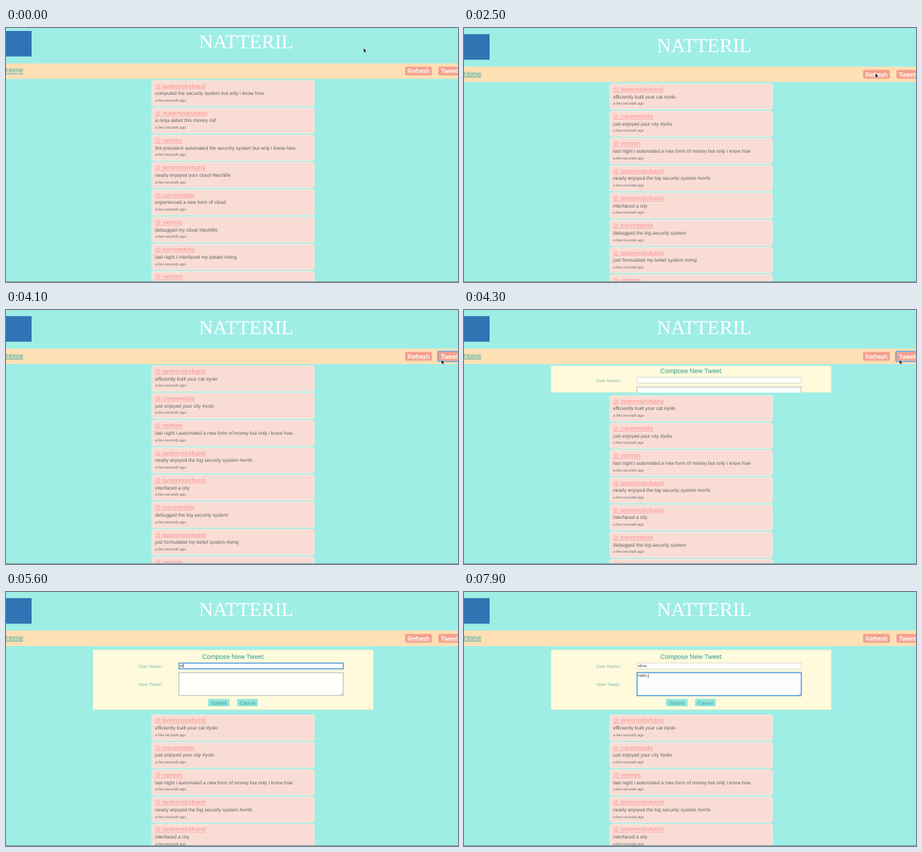
An HTML page that plays this animation: 600 by 338 pixels, repeating every 8000 ms.

```html
<!DOCTYPE html>
<html lang="en">
<head>
<meta charset="utf-8">
<title>Microblog demo</title>
<style>
  html, body { margin: 0; width: 100%; height: 100%; overflow: hidden; background: #9eeee6; }
  svg { display: block; width: 600px; height: 338px; }
  text { font-family: "Liberation Sans", Arial, sans-serif; text-rendering: geometricPrecision; white-space: pre; }
  .title { font: 26.3px "Liberation Serif", "Times New Roman", serif; fill: #fff; text-anchor: middle; }
  .home { font-size: 8.7px; text-decoration: underline; stroke-width: .15; }
  .btn { font-size: 8.3px; fill: #fff; stroke: #fff; stroke-width: .25; }
  .name { font-size: 7.7px; font-weight: bold; fill: #fba3a3; text-decoration: underline; }
  .msg { font-size: 6.5px; fill: #606060; }
  .ago { font-size: 4.9px; font-style: italic; fill: #666; }
  .head { font-size: 8.6px; fill: #58ada6; stroke: #58ada6; stroke-width: .2; text-anchor: middle; }
  .label { font-size: 6px; fill: #72bcb4; text-anchor: end; }
  .small { font-size: 6.6px; fill: #4b9d99; text-anchor: middle; }
  .typed { font-size: 5.4px; fill: #444; }
</style>
</head>
<body>
<svg viewBox="0 0 600 338">
  <defs><clipPath id="cut"><rect id="cutBox" x="115" width="373"/></clipPath></defs>
  <rect width="600" height="338" fill="#9eeee6"/>
  <g id="page">
    <rect y="8.2" width="34" height="34" fill="#3174b3"/>
    <text class="title" x="318.7" y="31.8">NATTERIL</text>
    <rect y="51.4" width="600" height="20.6" fill="#ffdfb4"/>
    <text class="home" id="home" x="-.3" y="63.8">Home</text>
    <rect x="529.8" y="55.8" width="35.6" height="11.6" rx="1.8" fill="#f5a08c"/>
    <text class="btn" x="533" y="64.7">Refresh</text>
    <rect x="574" y="55.8" width="30" height="11.6" rx="1.8" fill="#f5a08c"/>
    <text class="btn" x="577.3" y="64.7">Tweet</text>
    <rect id="ring" x="573.2" y="54.9" width="32" height="13.6" rx="1.5" fill="none" stroke="#65a5df" stroke-width="1.5"/>
    <g id="form" clip-path="url(#cut)">
      <rect id="panel" x="115.5" width="372" fill="#fffadb" stroke="#e3edc9" stroke-width=".8"/>
      <g id="fields">
        <text class="head" x="301.2" y="88.8">Compose New Tweet</text>
        <text class="label" x="207.6" y="100.6">User Name:</text>
        <rect id="user" x="229.7" y="94.6" width="218" height="7.7"/>
        <text class="typed" id="userText" x="231" y="100.2"></text>
        <text class="label" x="207.6" y="124.8">New Tweet:</text>
        <rect id="note" x="229.7" y="107.3" width="218" height="30.5"/>
        <path d="M444 137l3-3M445.8 137l1.200-1.200" stroke="#999" stroke-width=".5"/>
        <text class="typed" id="noteText" x="231" y="113.2"></text>
        <rect id="caret" width=".6" height="5.6" fill="#333"/>
        <rect x="268.4" y="142.4" width="28.200" height="9.700" fill="#8ee5dd"/>
        <text class="small" x="282.4" y="149.600">Submit</text>
        <rect x="306.800" y="142.400" width="27.200" height="9.700" fill="#8ee5dd"/>
        <text class="small" x="320.400" y="149.600">Cancel</text>
      </g>
    </g>
    <g id="oldList"></g>
    <g id="newList"></g>
  </g>
  <rect y="337" width="600" height="1" fill="#729f9b"/>
  <path id="arrow" d="M0 0V6.200L1.500 4.900L2.500 7.100L3.500 6.700L2.500 4.500H4.400Z" fill="#111" stroke="#fff" stroke-width=".5"/>
  <path id="beam" d="M-1.400-3Q0-3 0-2.200Q0-3 1.400-3M0-2.200V2.200M-1.400 3Q0 3 0 2.200Q0 3 1.400 3" fill="none" stroke="#333" stroke-width=".7"/>
</svg>
<script>
const LOOP = 8000, STEP = 100;
const REFRESH = 2500, OPEN = 4100, SLIDE = 430, FOCUS = 4800, TAB = 6600;
const SCROLL = 4.3, LIST_TOP = 74.2, PITCH = 36.27;
const $ = id => document.getElementById(id);

function add(parent, tag, attrs, text = "") {
  const node = document.createElementNS("http://www.w3.org/2000/svg", tag);
  set(node, attrs);
  node.textContent = text;
  parent.appendChild(node);
}
function set(node, attrs) {
  for (const key in attrs) node.setAttribute(key, attrs[key]);
}
const show = (node, on) => set(node, { visibility: on ? "visible" : "hidden" });
const move = (node, x, y) => set(node, { transform: `translate(${x} ${y})` });

const A = "lanternsbyhand", B = "hubertmalvoden", C = "velmon", D = "corynmelds";
const before = [
  [A, "computed the security system but only i know how"],
  [B, "a ninja aided this money #sf"],
  [C, "the president automated the security system but only i know how"],
  [A, "nearly enjoyed your cloud #techlife"],
  [D, "experienced a new form of cloud"],
  [C, "debugged my cloud #techlife"],
  [D, "last night i interfaced my potato #omg"],
  [C, ""]
];
const after = [
  [A, "efficiently built your cat #yolo"],
  [D, "just enjoyed your city #yolo"],
  [C, "last night i automated a new form of money but only i know how"],
  [A, "nearly enjoyed the big security system #vmfx"],
  [A, "interfaced a city"],
  [D, "debugged the big security system"],
  [A, "just formulated my belief system #omg"],
  [C, ""]
];

function buildList(list, posts) {
  posts.forEach(([user, msg], i) => {
    const y = LIST_TOP + i * PITCH;
    add(list, "rect", { x: 193.7, y, width: 215.6, height: 33.9, rx: 2, fill: "#f9ddd5", stroke: "#f4ebe0", "stroke-width": 1 });
    add(list, "text", { class: "name", x: 198, y: y + 9.7 }, "@ " + user);
    add(list, "text", { class: "msg", x: 198, y: y + 19.3 }, msg);
    add(list, "text", { class: "ago", x: 198, y: y + 28 }, "a few seconds ago");
  });
}
buildList($("oldList"), before);
buildList($("newList"), after);

// Pointer stops: time, x, y
const stops = [
  [500, 474.6, 26.5], [1400, 21.8, 54.8], [1800, 21.8, 54.8], [2400, 546, 60],
  [2900, 546, 60], [3400, 578.6, 64], [3800, 578.6, 64], [4000, 578, 66],
  [4300, 578, 66], [4500, 284.5, 100]
];
function pointerAt(t) {
  const i = stops.findIndex(s => s[0] > t);
  if (i === 0) return stops[0].slice(1);
  if (i < 0) return stops[stops.length - 1].slice(1);
  const a = stops[i - 1], b = stops[i];
  const p = (t - a[0]) / (b[0] - a[0]), e = p * p * (3 - 2 * p);
  return [a[1] + (b[1] - a[1]) * e, a[2] + (b[2] - a[2]) * e];
}

const userKeys = [5400, 5600, 5900, 6200, 6500];
const noteKeys = [6900, 7100, 7300, 7500, 7700, 7900];
const typed = (word, keys, t) => word.slice(0, keys.filter(k => k <= t).length);

function styleField(node, focused, edge) {
  set(node, {
    fill: focused ? "#fbfdff" : "#fffffc",
    stroke: focused ? "#5c9fdc" : edge,
    "stroke-width": focused ? 1.5 : .7
  });
}

function drawForm(t) {
  const p = Math.min(1, Math.max(0, (t - OPEN) / SLIDE));
  const f = .5 - Math.cos(Math.PI * p) / 2;
  const top = 72 + 5 * f, height = 79.5 * f;
  show($("form"), f > 0);
  set($("panel"), { y: top, height });
  set($("cutBox"), { y: top - .4, height: height + .8 });
  move($("fields"), 0, -9 * (1 - f));
  move($("newList"), 0, 89.5 * f);

  const inUser = t >= FOCUS && t < TAB, inNote = t >= TAB;
  styleField($("user"), inUser, "#d2d2c8");
  styleField($("note"), inNote, "#a3a39c");
  $("userText").textContent = typed("elina", userKeys, t);
  $("noteText").textContent = typed("hello ", noteKeys, t);

  const last = [FOCUS, ...userKeys, TAB, ...noteKeys].filter(k => k <= t).pop();
  const field = inNote ? $("noteText") : $("userText");
  const width = field.textContent ? field.getComputedTextLength() : 0;
  set($("caret"), { x: 231.3 + width, y: inNote ? 108.7 : 95.6 });
  set($("caret"), { opacity: t >= FOCUS && (t - last) % 1000 < 500 ? 1 : 0 });
}

function draw(t) {
  const fresh = t >= REFRESH;
  move($("page"), 0, fresh ? 0 : -SCROLL);
  $("oldList").style.display = fresh ? "none" : "";
  $("newList").style.display = fresh ? "" : "none";

  const [x, y] = pointerAt(t);
  const hover = x < 24 && y > 50;
  const ink = hover ? "#58c8b8" : "#55b3a9";
  set($("home"), { fill: ink, stroke: ink });
  show($("ring"), t >= 3900 && t < FOCUS);

  const overText = t >= 4500;
  show($("arrow"), !overText);
  show($("beam"), overText && t < userKeys[0]);
  move($("arrow"), x, y);
  move($("beam"), x, y);
  drawForm(t);
}

function tick() {
  const t = performance.now() % LOOP;
  draw(Math.floor(t / STEP) * STEP);
  requestAnimationFrame(tick);
}
tick();
</script>
</body>
</html>
```
